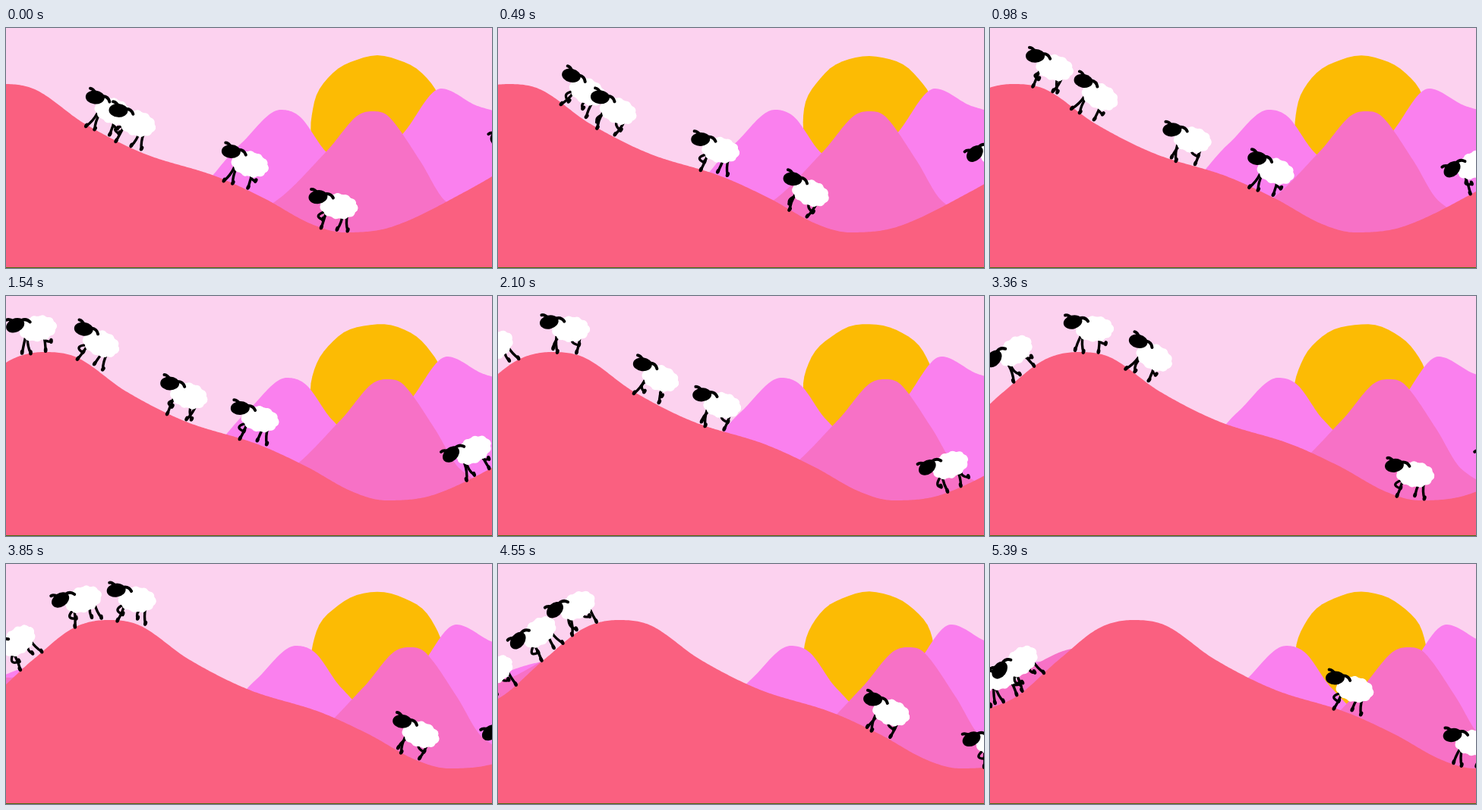
Recreate the animation shown at these times as an HTML page with a canvas. Size 640x317 px, loop 5460 ms.

```html
<!DOCTYPE html>
<html lang="en">
<head>
<meta charset="utf-8">
<title>Sheep on the hills</title>
<style>
html, body { margin: 0; width: 100%; height: 100%; overflow: hidden; background: #fcd2ef; }
canvas { display: block; width: 100vw; height: 100vh; }
</style>
</head>
<body>
<canvas id="stage" width="640" height="317"></canvas>
<script>
const W = 640, H = 317, LOOP = 5460, STEP = 70, TURN = 2 * Math.PI;
const ctx = document.getElementById('stage').getContext('2d');

// Key points of each ridge; speed is the rightward drift in px per second.
const far = {
  color: '#fa80ee', speed: 5.2,
  keys: [[-60, 160], [50, 128], [220, 235], [309, 153], [362, 108], [388, 118], [421, 163],
    [468, 200], [524, 138], [573, 80], [621, 103], [690, 120]]
};
const middle = {
  color: '#f771c6', speed: 12.6,
  keys: [[-40, 150], [50, 111], [260, 262], [350, 232], [422, 163], [460, 118], [482, 110],
    [505, 118], [545, 175], [578, 228], [640, 262]]
};
const near = {
  color: '#fa6080', speed: 35.8,
  keys: [[-240, 202], [-163, 178], [-103, 127], [-50, 85], [-4, 74], [40, 82], [103, 126],
    [182, 166], [274, 195], [340, 225], [400, 258], [446, 270], [510, 262], [605, 216], [700, 160]]
};

// Start x, speed in px per second, first half-step and half-steps per second.
const flock = [
  { x: 123, speed: 54, phase: 1, pace: 5.1 },
  { x: 156, speed: 32.5, phase: 0, pace: 5.1 },
  { x: 305, speed: 52, phase: 1, pace: 5.9 },
  { x: 427, speed: 69, phase: 0, pace: 5.1 },
  { x: 687, speed: 41, phase: 0, pace: 5.9 },
  { x: 790, speed: 30, phase: 1, pace: 5.9 }
];

// Tangent at a key point, level at peaks and valleys.
function slope(keys, i) {
  const a = keys[i - 1] || keys[i], b = keys[i + 1] || keys[i], y = keys[i][1];
  return (y - a[1]) * (b[1] - y) < 0 ? 0 : (b[1] - a[1]) / (b[0] - a[0]);
}

function heightAt(layer, x) {
  const keys = layer.keys;
  let i = 0;
  while (i < keys.length - 2 && x > keys[i + 1][0]) i++;
  const [x0, y0] = keys[i], [x1, y1] = keys[i + 1];
  const d = x1 - x0, s = Math.min(1, Math.max(0, (x - x0) / d)), r = 1 - s;
  return y0 + (y1 - y0) * s * s * (3 - 2 * s) +
    d * s * r * (r * slope(keys, i) - s * slope(keys, i + 1));
}

function drawRidge(layer, t) {
  ctx.fillStyle = layer.color;
  ctx.beginPath();
  ctx.moveTo(0, H);
  for (let x = 0; x <= W; x += 2) ctx.lineTo(x, heightAt(layer, x - layer.speed * t));
  ctx.lineTo(W, H);
  ctx.fill();
}

// The rim trembles a little, as if redrawn by hand.
function drawSun(t) {
  const k = Math.floor(t * 7);
  ctx.fillStyle = '#fcbb04';
  ctx.beginPath();
  for (let a = 0; a < TURN; a += TURN / 60) {
    const r = 87.5 + 0.5 * Math.sin(7 * a + k) + 0.4 * Math.sin(11 * a - 2 * k);
    ctx.lineTo(489 + r * Math.cos(a), 124.5 + r * Math.sin(a));
  }
  ctx.fill();
}

function oval(x, y, rx, ry, turn = 0) {
  ctx.beginPath();
  ctx.ellipse(x, y, rx, ry, turn, 0, TURN);
  ctx.fill();
}

function limb(x0, y0, cx, cy, x1, y1, width) {
  ctx.lineWidth = width;
  ctx.beginPath();
  ctx.moveTo(x0, y0);
  ctx.quadraticCurveTo(cx, cy, x1, y1);
  ctx.stroke();
}

// q is the leg's place in its cycle: 0 is mid-swing, 0.5 mid-stance.
function drawLeg(hip, foot, q) {
  const lift = Math.max(0, Math.cos(TURN * q));
  const x = foot - 5 * Math.sin(TURN * q) + 3 * lift, y = -1 - 11 * lift;
  limb(hip, -22, (hip + foot) / 2 - 12 * lift, -11 - 4 * lift, x, y, 3.4);
  oval(x, y - 1, 2.4, 3.6, 0.2);
}

function drawSheep(x, y, tilt, halfSteps) {
  ctx.save();
  ctx.translate(x, y);
  ctx.rotate(tilt);
  ctx.fillStyle = ctx.strokeStyle = '#000';
  const q = halfSteps / 4;
  drawLeg(-11, -14, q);
  drawLeg(-8, -12, q + 0.5);
  drawLeg(14, 14, q + 0.25);
  drawLeg(20, 18, q + 0.75);

  ctx.fillStyle = '#fff';
  oval(7.5, -32, 24, 16);
  for (let a = 0; a < TURN; a += TURN / 11) {
    oval(7.5 + 19 * Math.cos(a), -32 + 11 * Math.sin(a), 6.3, 6.3);
  }

  ctx.fillStyle = '#000';
  oval(-21, -41, 12.5, 9, -0.25);
  limb(-31, -50, -27, -51, -22, -46, 4);
  limb(-12, -46, -5, -48, -1, -42, 4);
  ctx.restore();
}

// A sheep stands on the hill and leans with the ground below its feet.
function walk(sheep, t) {
  const x = sheep.x - sheep.speed * t, reach = 15;
  const [back, front] = [-reach, reach].map(d => heightAt(near, x + d - near.speed * t));
  const tilt = 0.85 * Math.atan2(front - back, 2 * reach) - 0.08;
  drawSheep(x, (back + front) / 2, tilt, sheep.phase + sheep.pace * t);
}

function draw(t) {
  ctx.fillStyle = '#fcd2ef';
  ctx.fillRect(0, 0, W, H);
  drawSun(t);
  [far, middle, near].forEach(layer => drawRidge(layer, t));
  ctx.lineCap = 'round';
  flock.forEach(sheep => walk(sheep, t));
  ctx.fillStyle = '#4c6c0c';
  ctx.fillRect(0, H - 1, W, 1);
}

const start = performance.now();
function frame() {
  const t = (performance.now() - start) % LOOP;
  draw(Math.floor(t / STEP) * STEP / 1000);
  requestAnimationFrame(frame);
}
frame();
</script>
</body>
</html>
```
